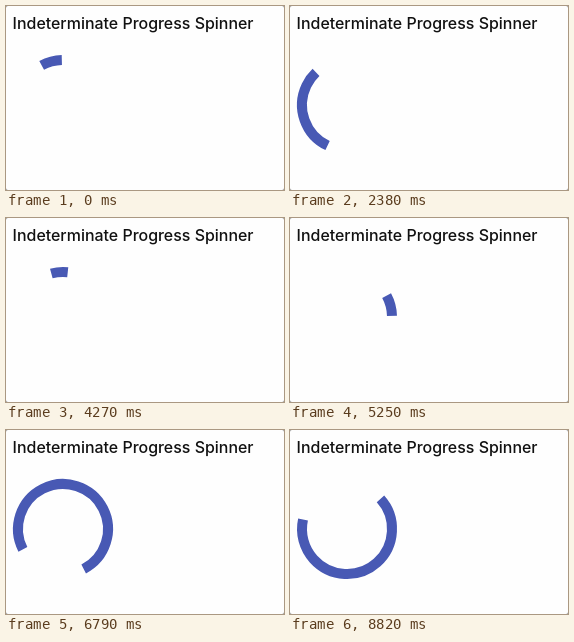
These frames come from a looping animation (278x184 px, 8890 ms). An HTML page:

```html
<!DOCTYPE html>
<html lang="en">
<meta charset="utf-8">
<title>Indeterminate Progress Spinner</title>
<style>
  html, body { margin: 0; width: 100%; height: 100%; overflow: hidden; background: #8a8a8a; }
  svg { display: block; width: 278px; height: 184px; background: #fefefe; border-radius: 2px; }
  text { font: 500 15.95px Inter, Roboto, sans-serif; fill: #111; }
  circle { fill: none; stroke: #4859b4; stroke-width: 10; }
</style>
<svg viewBox="0 0 278 184">
  <text x="6.6" y="23">Indeterminate Progress Spinner</text>
  <circle id="arc" cx="57" cy="99" r="45" pathLength="360"/>
</svg>
<script>
  const arc = document.getElementById('arc');
  const STEP = 70, STEPS = 127;
  const HALF = 500;            // ms for growing, and again for shrinking
  const MIN = 18, MAX = 288;   // arc length in degrees

  // cubic-bezier(0.35, 0, 0.25, 1), solved by bisection
  function ease(x) {
    let lo = 0, hi = 1, u;
    for (let i = 0; i < 20; i++) {
      u = (lo + hi) / 2;
      const v = 1 - u;
      if (1.05 * u * v * v + 0.75 * u * u * v + u * u * u < x) lo = u;
      else hi = u;
    }
    return u * u * (3 - 2 * u);
  }

  // The spinner moves at 24 fps, sampled 15 times a second.
  function spinnerTime(step) {
    return 892 + Math.floor(step * 24 / 15) * 1000 / 24;
  }

  function draw(now) {
    const t = spinnerTime(Math.floor(now / STEP) % STEPS);
    const turn = Math.floor(t / (2 * HALF));
    const phase = t % (2 * HALF);
    const growing = phase < HALF;
    const p = ease(phase % HALF / HALF);
    const length = growing ? MIN + (MAX - MIN) * p : MAX - (MAX - MIN) * p;
    // The tail is pinned while growing, the head while shrinking.
    const base = 180 + 90 * turn + 0.18 * phase;
    const tail = growing ? base : base + MAX - length;
    arc.setAttribute('stroke-dasharray', `${length} 360`);
    arc.setAttribute('transform', `rotate(${tail % 360} 57 99)`);
  }

  const start = performance.now();
  function loop() {
    draw(performance.now() - start);
    requestAnimationFrame(loop);
  }
  loop();
</script>
</html>
```
